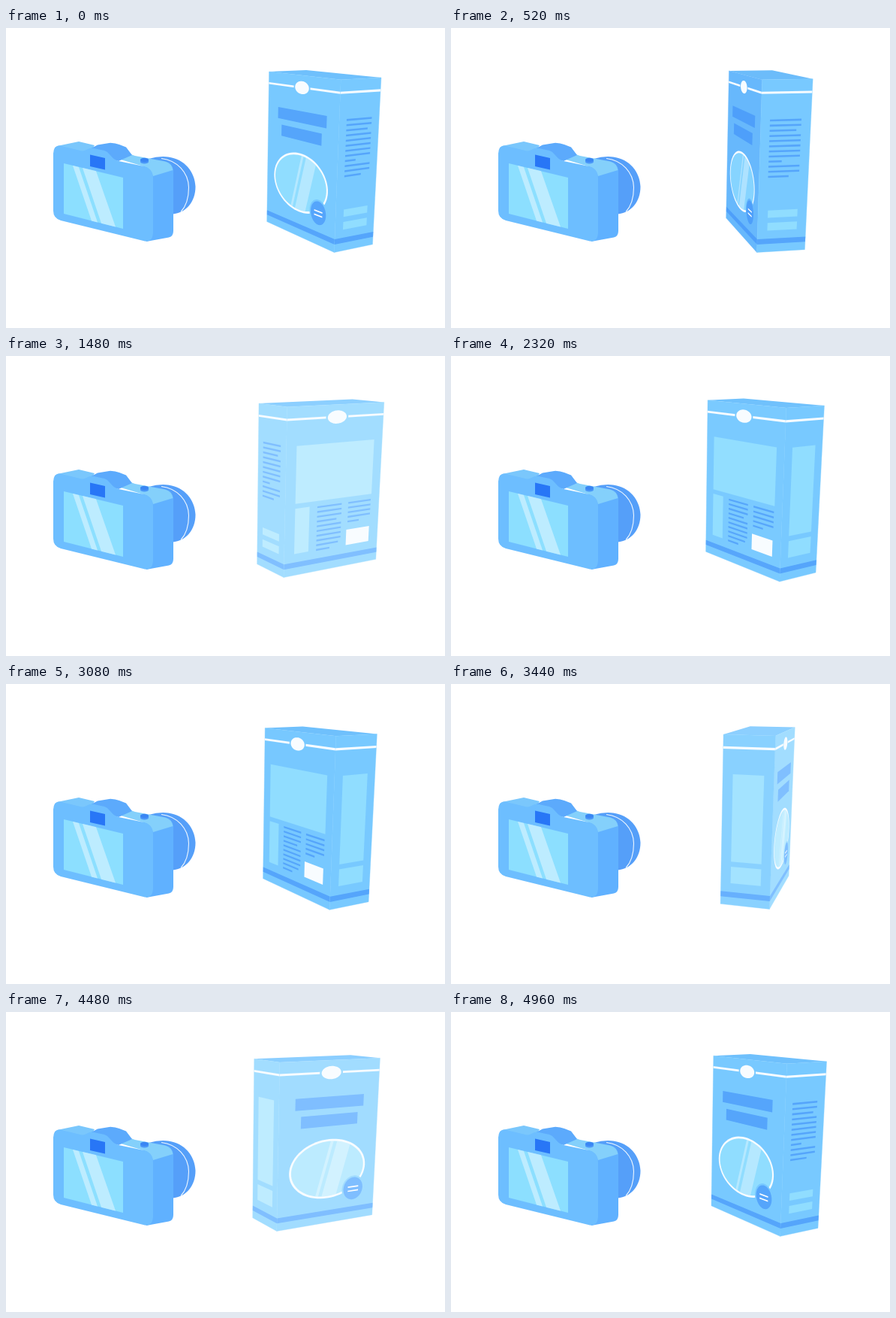
An HTML page with a canvas that plays this animation: 585 px wide and 399 px high, repeating every 5080 ms.

```html
<!DOCTYPE html>
<html>
<head>
<meta charset="utf-8">
<style>
html, body { margin: 0; width: 100%; height: 100%; overflow: hidden; background: #fff; }
canvas { display: block; }
</style>
</head>
<body>
<canvas id="stage" width="585" height="399"></canvas>
<script>
const ctx = document.getElementById('stage').getContext('2d');
const LOOP = 5080;
const WHITE = '#f8fcff';

// Each tone in shade, in normal light and in bright light
const TONES = {
  base: [0x67b8fc, 0x78c9ff, 0xa2ddff],
  dark: [0x4e9ffa, 0x55a5fb, 0x80bfff],
  pale: [0x86d4ff, 0x90ddff, 0xbeecff],
  top: [0x6cbcfa, 0x6fc0fc, 0x8ccfff]
};

// Camera: focal length, pitch; the box turns around PIVOT (x, distance)
const FOCAL = 890, PITCH = 13 * Math.PI / 180;
const COS = Math.cos(PITCH), SIN = Math.sin(PITCH);
const PIVOT = [154.4, 1102.7];
const W = 194, D = 79.5, H = 270.5, DROP = 81.3;
const TURNS = [[140, 1140], [1730, 2490], [3000, 3860], [4340, 5060]];

const clamp = (x, lo, hi) => Math.min(hi, Math.max(lo, x));
const ease = p => p < .5 ? 4 * p ** 3 : 1 - 4 * (1 - p) ** 3;
const angleAt = t => TURNS.reduce(
  (sum, [a, b]) => sum + 90 * ease(clamp((t - a) / (b - a), 0, 1)), 60.3);

// light: -1 shade, 0 normal, 1 bright
function tone(name, light) {
  const [shade, normal, bright] = TONES[name];
  const to = light < 0 ? shade : bright, k = Math.abs(light);
  const mix = s => {
    const a = normal >> s & 255, b = to >> s & 255;
    return Math.round(a + (b - a) * k);
  };
  return `rgb(${mix(16)},${mix(8)},${mix(0)})`;
}

function project(x, h, z) {
  const depth = z * COS + h * SIN;
  return [292.5 + FOCAL * x / depth, 199.5 + FOCAL * (h * COS - z * SIN) / depth];
}

function trace(pts) {
  ctx.beginPath();
  pts.forEach(p => ctx.lineTo(...p));
  ctx.closePath();
}
function poly(pts, fill) {
  trace(pts);
  ctx.fillStyle = fill;
  ctx.fill();
}
function shape(d, fill) {
  ctx.fillStyle = fill;
  ctx.fill(new Path2D(d));
}

// Light depends on the direction a face looks in
function lightFor(deg, wide) {
  const look = ((deg + 180) % 360 + 360) % 360 - 180;
  if (!wide) return clamp((look + 10) / 70, 0, 1);
  return look > 60 ? -clamp((look - 60) / 20, 0, 1) : clamp((60 - look) / 90, 0, 1);
}

function makeFace(center, deg, wide) {
  const [width, depth] = wide ? [W, D] : [D, W];
  const b = deg * Math.PI / 180;
  const n = [-Math.sin(b), -Math.cos(b)], r = [Math.cos(b), -Math.sin(b)];
  const mid = [center[0] + n[0] * depth / 2, center[1] + n[1] * depth / 2];
  const light = lightFor(deg, wide);
  // a and v run from 0 to 1 across and down the face
  const at = (a, v) => project(
    mid[0] + r[0] * (a - .5) * width, DROP + v * H, mid[1] + r[1] * (a - .5) * width);
  const quad = (a0, v0, a1, v1) => [at(a0, v0), at(a1, v0), at(a1, v1), at(a0, v1)];
  const oval = (a, v, rx, ry) => Array.from({ length: 72 }, (_, i) => {
    const q = i * Math.PI / 36;
    return at(a + rx * Math.cos(q) / width, v + ry * Math.sin(q) / H);
  });
  return {
    at, quad, oval, light,
    visible: n[0] * mid[0] + n[1] * mid[1] < 0,
    base: tone('base', light),
    dark: tone('dark', light),
    pale: tone('pale', light),
    rect: (a0, v0, a1, v1, fill) => poly(quad(a0, v0, a1, v1), fill),
    disc: (a, v, rx, ry, fill) => poly(oval(a, v, rx, ry), fill)
  };
}

function textLines(face, a0, a1, v, ends) {
  ends.forEach((e, i) => {
    const y = v + i * .0294;
    face.rect(a0, y - .0055, a0 + (a1 - a0) * e, y + .0055, face.dark);
  });
}

function emblem(face) {
  face.disc(.5, .073, 22.5, 12.5, face.base);
  face.disc(.5, .073, 19, 10.4, WHITE);
}

function front(face) {
  emblem(face);
  face.rect(.155, .214, .845, .285, face.dark);
  face.rect(.213, .322, .787, .393, face.dark);
  face.disc(.5, .657, 76, 50, WHITE);
  const lens = face.oval(.5, .657, 72, 46.5);
  poly(lens, face.pale);
  ctx.save();
  trace(lens);
  ctx.clip();
  for (const [x, w] of [[4, 6], [17, 29]]) {
    const p = (dx, dy) => face.at(.5 + dx / W, .657 + dy / H);
    poly([p(x, -48), p(x + w, -48), p(x + w - 29, 48), p(x - 29, 48)], 'rgba(255,255,255,.33)');
  }
  ctx.restore();
  face.disc(.773, .803, 23.2, 22.3, face.base);
  face.disc(.773, .803, 20, 19.4, face.dark);
  for (const v of [.792, .818]) face.rect(.717, v - .004, .829, v + .004, '#fff');
}

function textSide(face) {
  textLines(face, .18, .81, .227, [1, 1, .85, 1, 1, 1, 1, 1, .42, 1, 1, .66]);
  face.rect(.2, .749, .81, .793, face.pale);
  face.rect(.2, .824, .81, .871, face.pale);
}

function back(face) {
  emblem(face);
  face.rect(.1, .224, .91, .563, face.pale);
  face.rect(.1, .592, .245, .867, face.pale);
  textLines(face, .325, .583, .601, [1, 1, 1, .8, 1, 1, 1, 1, .9, .55]);
  textLines(face, .654, .904, .601, [1, 1, 1, 1, .5]);
  face.rect(.644, .77, .9, .868, WHITE);
}

function panelSide(face) {
  face.rect(.2, .222, .81, .735, face.pale);
  face.rect(.2, .765, .81, .866, face.pale);
}

const SIDES = [front, textSide, back, panelSide];

function drawBox(deg) {
  const b = deg * Math.PI / 180, s = Math.sin(b), c = Math.cos(b);
  const center = [PIVOT[0] + 5 * s - c, PIVOT[1] + 5 * c + s];
  const faces = SIDES.map((_, k) => makeFace(center, deg - 90 * k, k % 2 === 0));
  const nearWide = faces[0].visible ? faces[0] : faces[2];

  poly(faces.map(f => f.at(0, 0)), tone('top', nearWide.light));

  faces.forEach((face, k) => {
    if (!face.visible) return;
    poly(face.quad(0, 0, 1, 1), face.base);
    ctx.strokeStyle = face.base;
    ctx.lineWidth = .4;
    ctx.stroke();
    face.rect(0, .066, 1, .079, WHITE);
    face.rect(0, .92, 1, .952, face.dark);
    SIDES[k](face);
  });
}

function drawCamera() {
  // lens
  shape('M190 174Q204 170 216 171.5C238 174 252 192 252.5 211C252.5 231 240 246 222 247.5L200 240Z', '#559ff9');
  ctx.strokeStyle = '#eef7ff';
  ctx.lineWidth = 1.1;
  ctx.stroke(new Path2D('M207 173.5C228 176 243 192 243.5 212C243.5 226 240 237 233 244.5'));
  // body side and tops
  shape('M180 184L214 178Q222 180 223 190V270Q223 277 217 278.5L187 284Z', '#60b1ff');
  shape('M136 170L160 166L172 170L212 177.5Q221 180 222.5 189L196 197Q192 186 185 184.5Z', '#84d0fb');
  shape('M68 157L97 151L118 156L112 166L102 165Z', '#7ac7fc');
  shape('M104 165L122 155.5L139 152.8Q146 153 151 155L160 158.5L168 169L150 177Z', '#5caafc');
  // back of the body
  shape('M63 167Q63.5 155 73 156.8L101 163.5Q104 164 108 161.5Q112 159 117 160L131 163Q135 164 138 168L142 172.5Q145 176 150 177L184 184Q196 187 196 200V273Q195 285 185 283.5L73 256Q63 253 63 243Z', '#6dbeff');
  // finder, button, screen
  shape('M112 168.5L132 173V188.5L112 184Z', '#2876f6');
  shape('M179 175.5V178A5.5 2.6 0 0 0 190 178V175.5Z', '#4a97f8');
  shape('M179 175.5A5.5 2.7 0 1 1 190 175.5A5.5 2.7 0 1 1 179 175.5Z', '#3a86f3');
  shape('M77 180L156 199V267L77 247Z', '#8cdfff');
  shape('M89 183L97 185L122 258.5L114 256.5Z', '#bdecff');
  shape('M102 186L120 190.3L146 264.5L127 259.7Z', '#bdecff');
}

function frame(now) {
  ctx.fillStyle = '#fff';
  ctx.fillRect(0, 0, 585, 399);
  drawCamera();
  drawBox(angleAt(now % LOOP));
  requestAnimationFrame(frame);
}
requestAnimationFrame(frame);
</script>
</body>
</html>
```
